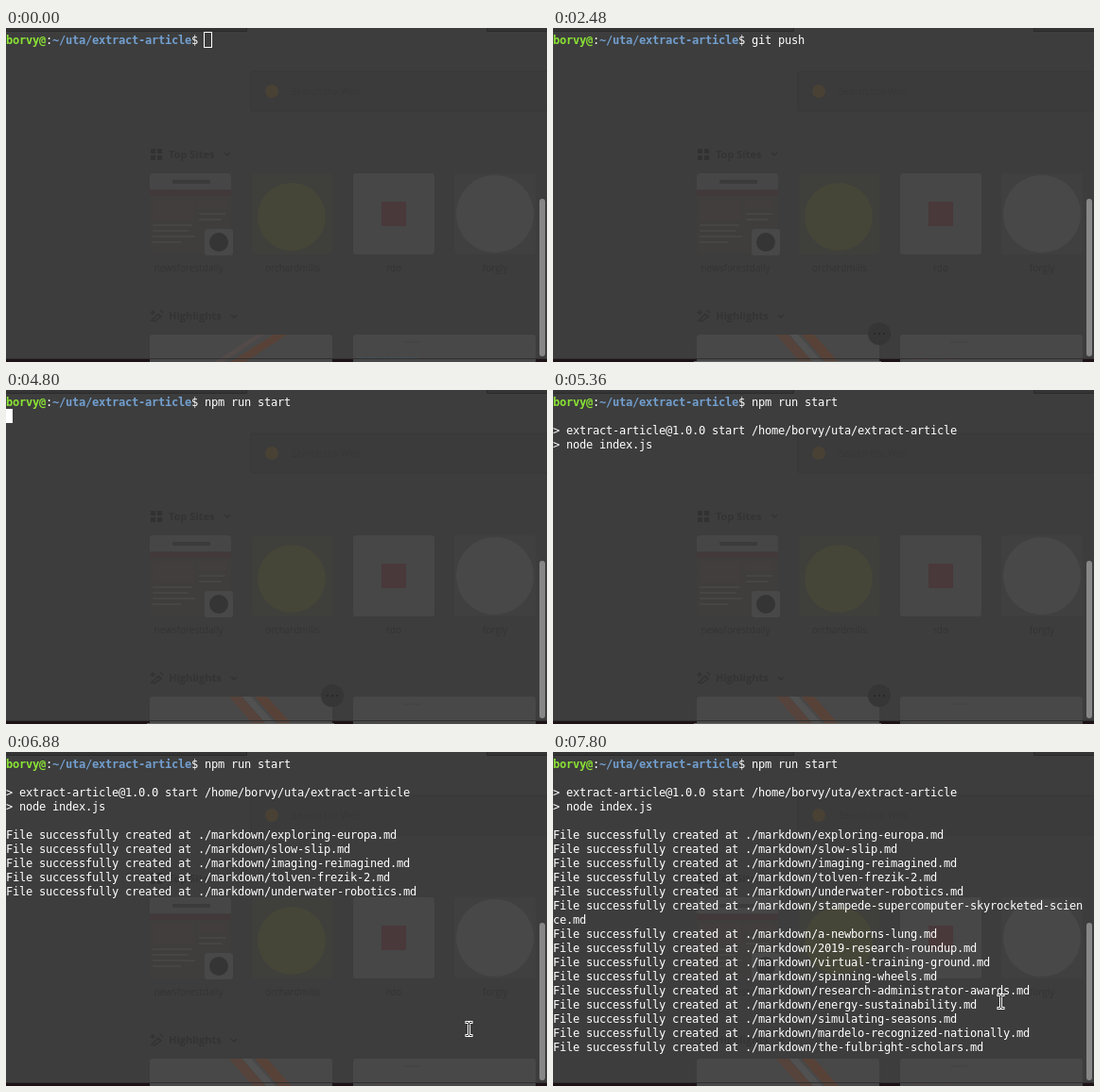
These frames come from a looping animation (572x354 px, 8 s). An HTML page:

```html
<!DOCTYPE html>
<html lang="en">
<head>
<meta charset="utf-8">
<title>Terminal session</title>
<style>
html, body { margin: 0; width: 100%; height: 100%; overflow: hidden; background: #3d3d3d; }
svg { display: block; }
.term text { font: 12px "DejaVu Sans Mono", monospace; fill: #fff; }
.term .bold { font-weight: bold; }
.term .user { fill: #8ae234; }
.term .path { fill: #729fcf; }
.page text { font: 10px "Open Sans", sans-serif; fill: #343434; }
.page .head { font-weight: bold; font-size: 11px; }
.page .label { text-anchor: middle; }
</style>
</head>
<body>
<svg width="572" height="354" viewBox="0 0 572 354">
  <rect width="572" height="354" fill="#3d3d3d"/>

  <!-- dim browser page behind the terminal -->
  <g class="page">
    <path d="M0 0H254V3H0zM508 0H572V3H508z" fill="#343434"/>
    <path d="M0 3.5H254.5V0M572 3.5H508.5V0" fill="none" stroke="#2a2a2a"/>
    <rect x="259" y="46" width="320" height="42" rx="2" fill="#3b3b3b" stroke="#393939"/>
    <circle cx="281" cy="67" r="7" fill="#4a4135"/>
    <text x="302" y="71" style="fill:#383838">Search the Web</text>

    <path d="M153 128h5v5h-5zM160 128h5v5h-5zM153 135h5v5h-5zM160 135h5v5h-5z" fill="#323232"/>
    <text class="head" x="172" y="138">Top Sites</text>
    <path d="M231 132l3 3 3-3" fill="none" stroke="#333" stroke-width="1.5"/>

    <rect x="152" y="154" width="86" height="86" rx="3" fill="#403d3d"/>
    <path d="M152 157q0-3 3-3h80q3 0 3 3v14h-86z" fill="#464646"/>
    <path d="M176 161h40v4h-40z" fill="#3b3b3b"/>
    <path d="M152 172h86v6h-86z" fill="#42393a"/>
    <path d="M155 182h44v22h-44zM203 182h30v10h-30z" fill="#433e3e"/>
    <path d="M155 209h42M155 215h38M155 221h45M155 227h30M204 197h28M204 203h24" stroke="#464545" stroke-width="2"/>
    <rect x="210" y="213" width="30" height="28" rx="3" fill="#484848"/>
    <circle cx="225" cy="227" r="10" fill="#353535"/>

    <rect x="260" y="154" width="85" height="86" rx="3" fill="#3f3f3c"/>
    <circle cx="302" cy="200" r="36" fill="#464638"/>

    <rect x="367" y="154" width="86" height="86" rx="3" fill="#474747"/>
    <rect x="397" y="184" width="26" height="26" fill="#49393a"/>

    <rect x="474" y="154" width="86" height="86" rx="3" fill="#404040"/>
    <circle cx="517" cy="197" r="41" fill="#484848"/>

    <text class="label" x="193" y="258">newsforestdaily</text>
    <text class="label" x="303" y="258">orchardmills</text>
    <text class="label" x="410" y="258">rdo</text>
    <text class="label" x="517" y="258">forgly</text>

    <path d="M154 310l7-7 3 3-7 5zM155 299v5M152.500 301.500h5M163 299l3 3" fill="none" stroke="#333" stroke-width="1.500"/>
    <text class="head" x="172" y="309">Highlights</text>
    <path d="M238 304l3 3 3-3" fill="none" stroke="#333" stroke-width="1.5"/>

    <path d="M152 354v-26q0-3 3-3h187q3 0 3 3v26zM367 354v-26q0-3 3-3h187q3 0 3 3v26z" fill="#484848"/>
    <g id="idle">
      <path d="M283 325h14l-44 29h-16z" fill="#584238"/>
      <path d="M265 325h8l-43 29h-10z" fill="#534a4a"/>
      <path d="M372 350h66" stroke="#42525a" stroke-width="2" stroke-dasharray="9 2"/>
      <path d="M420 333h18" stroke="#414141"/>
    </g>
    <g id="moved">
      <path d="M236 325h13l26 29h-14z" fill="#56433b"/>
      <path d="M250 325h9l26 29h-10z" fill="#515151"/>
      <path d="M263 325h13l26 29h-14z" fill="#584238"/>
      <path d="M381 351h48" stroke="#544344" stroke-width="1.500" stroke-dasharray="5 6"/>
      <path d="M420 333h18" stroke="#414141"/>
    </g>
    <g id="menu">
      <circle cx="345" cy="324" r="12" fill="#363636"/>
      <path d="M339 324h2M344 324h2M349 324h2" stroke="#292929" stroke-width="2"/>
    </g>
    <rect y="350" width="572" height="1" fill="#303030"/>
    <path d="M0 351H152V354H0zM345 351H367V354H345zM560 351H572V354H560z" fill="#1d1317"/>
    <rect id="edge" x="149" y="353" width="198" height="1" fill="#606060"/>
  </g>

  <rect x="564" y="181" width="6" height="167" rx="3" fill="#878787"/>

  <g class="term">
    <g id="prompt"></g>
    <g id="rows"></g>
    <rect id="hollow" x="209.500" y="4.500" width="8" height="16" fill="none" stroke="#fff"/>
    <rect id="block" width="7" height="15" fill="#fff"/>
  </g>

  <g id="mouse" fill="none" stroke-linecap="square">
    <path d="M-2.500-7h1.500l1 1 1-1h1.500M0-6V6M-2.500 7h1.500l1-1 1 1h1.500" stroke="#fff" stroke-width="3"/>
    <path d="M-2.500-7h1.500l1 1 1-1h1.500M0-6V6M-2.500 7h1.500l1-1 1 1h1.500" stroke="#111"/>
  </g>
</svg>

<script>
const LOOP = 8000, CELL = 7, LINE = 15, TOP = 5, COLS = 80, PROMPT = 30;
const $ = id => document.getElementById(id);

const files = [
  "exploring-europa", "slow-slip", "imaging-reimagined", "tolven-frezik-2",
  "underwater-robotics", "stampede-supercomputer-skyrocketed-science",
  "a-newborns-lung", "2019-research-roundup", "virtual-training-ground",
  "spinning-wheels", "research-administrator-awards", "energy-sustainability",
  "simulating-seasons", "mardelo-recognized-nationally", "the-fulbright-scholars"
];
const banner = [
  "",
  "> extract-article@1.0.0 start /home/borvy/uta/extract-article",
  "> node index.js",
  ""
];

// [time, command]
const commands = [
  [0, ""], [1360, "clear"], [1880, "git push"],
  [2520, 'git commit -m "update readme"'], [3320, "git add ."], [3720, "npm run start"]
];
// [time, block cursor shown]
const blinks = [
  [0, 0], [360, 1], [960, 0], [1360, 1], [2480, 0], [2560, 1], [3120, 0], [3360, 1],
  [4280, 0], [4760, 1], [5360, 0], [5960, 1], [6520, 0], [7200, 1], [7760, 0]
];
// [time, files written]
const written = [
  [0, 0], [6800, 1], [6840, 3], [6880, 5], [6920, 6], [6960, 7], [7000, 8],
  [7040, 9], [7120, 10], [7160, 11], [7760, 13], [7800, 15]
];
// [time, x, y]
const track = [[6800, 503, 338], [6880, 489, 293], [7160, 473, 264]];
const ENTER = 4800, OUTPUT = 4960, HOVER = 360, LEAVE = 6800;

const at = (steps, t) => steps.filter(s => s[0] <= t).pop()[1];

// Every glyph sits on the terminal's cell grid.
function put(parent, str, row, col = 0, cls = "") {
  const el = document.createElementNS("http://www.w3.org/2000/svg", "text");
  el.setAttribute("x", [...str].map((_, i) => (col + i) * CELL).join(" "));
  el.setAttribute("y", TOP + row * LINE + 12);
  el.setAttribute("class", cls);
  el.textContent = str;
  parent.append(el);
}

function wrap(str) {
  const out = [];
  do { out.push(str.slice(0, COLS)); str = str.slice(COLS); } while (str);
  return out;
}

function mousePos(t) {
  let i = track.findIndex(p => p[0] > t);
  if (i < 0) return track[track.length - 1].slice(1);
  i = Math.max(i, 1);
  const [t0, x0, y0] = track[i - 1], [t1, x1, y1] = track[i];
  const k = (t - t0) / (t1 - t0);
  const e = i === 1 ? k : 1 - (1 - k) ** 2;
  return [Math.round(x0 + (x1 - x0) * e), Math.round(y0 + (y1 - y0) * e)];
}

const show = (id, on) => { $(id).style.display = on ? "" : "none"; };

let lastKey;
function render(now) {
  const t = Math.floor((now % LOOP) / 40) * 40;
  const cmd = at(commands, t), count = at(written, t);
  let lines = [];
  if (t >= OUTPUT) {
    const log = files.slice(0, count).map(f => `File successfully created at ./markdown/${f}.md`);
    lines = [...banner, ...log.flatMap(wrap)];
  }

  const key = cmd + "|" + lines.length;
  if (key !== lastKey) {
    lastKey = key;
    $("rows").replaceChildren();
    if (cmd) put($("rows"), cmd, 0, PROMPT);
    lines.forEach((s, i) => s && put($("rows"), s, i + 1));
  }

  const entered = t >= ENTER;
  $("block").setAttribute("x", entered ? 0 : (PROMPT + cmd.length) * CELL);
  $("block").setAttribute("y", TOP + (entered ? lines.length + 1 : 0) * LINE);
  show("block", at(blinks, t));
  show("hollow", t < HOVER);

  show("idle", t < HOVER);
  show("moved", t >= HOVER);
  show("menu", t >= HOVER && t < LEAVE);
  show("edge", t >= 640 && t < LEAVE);

  show("mouse", t >= LEAVE);
  $("mouse").setAttribute("transform", `translate(${mousePos(t).map(v => v + 0.5)})`);
}

put($("prompt"), "borvy@", 0, 0, "bold user");
put($("prompt"), ":", 0, 6);
put($("prompt"), "~/uta/extract-article", 0, 7, "bold path");
put($("prompt"), "$", 0, 28);

const start = performance.now();
function tick() {
  render(performance.now() - start);
  requestAnimationFrame(tick);
}
tick();
</script>
</body>
</html>
```
